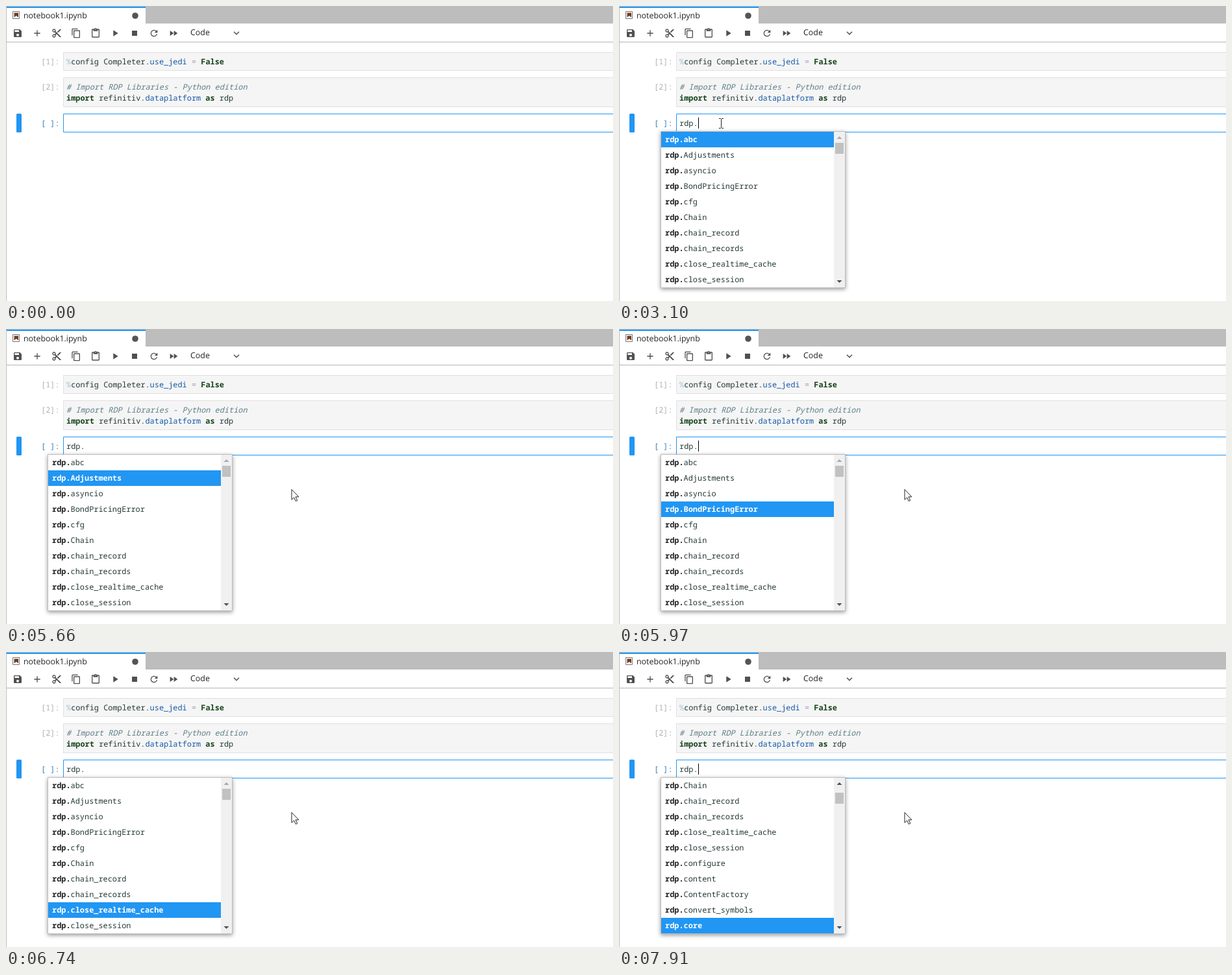
An HTML page for the animation above (8000 ms loop, 935 px wide and 455 px high).

```html
<!DOCTYPE html>
<html lang="en">
<head>
<meta charset="utf-8">
<title>Notebook completion</title>
<style>
html, body { margin: 0; width: 100%; height: 100%; overflow: hidden; background: #fff; }
svg { display: block; }
text { font: 11.91px "Noto Sans Mono", monospace; fill: #263a3a; text-rendering: geometricPrecision; white-space: pre; }
.ui { font: 12.4px "Open Sans", "Noto Sans", sans-serif; fill: #212121; }
.kw { font-weight: bold; fill: #17431b; }
.prop { fill: #1759a8; }
.note { font-style: italic; fill: #5f7f8a; }
.num { fill: #b0b0b0; }
.cell { fill: #f5f5f5; stroke: #e0e0e0; }
.icon { fill: #505050; }
#popup .frame { fill: #fff; stroke: #bdbdbd; filter: drop-shadow(0 2px 3px rgba(0, 0, 0, .4)); }
.head { font-weight: bold; fill: #212121; }
.hover { opacity: .8; }
.hover rect { fill: #eee; }
.active rect { fill: #2196f3; }
.active text, .active .head { fill: #fff; font-weight: bold; }
</style>
</head>
<body>
<svg width="935" height="455" viewBox="0 0 935 455">
  <path fill="#bdbdbd" d="M0 0H935V27H0zM0 27H1V455H0zM0 55H935V56H0z"/>
  <path fill="#f2f2f2" d="M1 56H935V57H1z"/>
  <path fill="#fff" d="M1 1H215V28H1z"/>
  <path fill="#2196f3" d="M1 1H215V3H1z"/>
  <path fill="#fff" stroke="#757575" d="M10.5 8.5h10v11h-10z"/>
  <path fill="#74391a" d="M12.5 10.5h6.5v7l-3.2-2.6-3.3 2.6z"/>
  <text class="ui" x="27" y="19">notebook1.ipynb</text>
  <circle cx="199" cy="15" r="4.8" fill="#555"/>
  <g id="tools" class="icon"></g>
  <text class="ui" x="284" y="45">Code</text>
  <path fill="none" stroke="#505050" stroke-width="1.5" d="M351 39.8l4 4 4-4"/>

  <path class="cell" d="M88.5 71.5H940V99.5H88.5zM88.5 110.5H940V155.5H88.5z"/>
  <path fill="#fff" stroke="#2196f3" d="M88.5 166.5H940V194.5H88.5z"/>
  <rect x="16" y="166" width="8" height="29" rx="1.5" fill="#2196f3"/>
  <text class="num" x="54" y="90">[1]:</text>
  <text class="num" x="54" y="129">[2]:</text>
  <text x="54" y="185" style="fill:#307fc1">[ ]:</text>
  <text x="93" y="90"><tspan fill="#a5c6d8">%</tspan>config Completer.<tspan class="prop">use_jedi</tspan> <tspan fill="#a29aae">=</tspan> <tspan class="kw">False</tspan></text>
  <text class="note" x="93" y="129"># Import RDP Libraries - Python edition</text>
  <text x="93" y="146"><tspan class="kw">import</tspan> refinitiv.<tspan class="prop">dataplatform</tspan> <tspan class="kw">as</tspan> rdp</text>
  <text id="typed" x="93" y="185"></text>
  <rect id="caret" y="172" width="1" height="17"/>

  <g id="popup">
    <rect class="frame" x="64.5" y="193.5" width="284" height="241"/>
    <g id="rows"></g>
    <path fill="#f0f0f0" d="M331 194h17v240h-17z"/>
    <rect id="thumb" x="333" width="13" height="17" fill="#c1c1c1"/>
    <path id="up" d="M335.5 205l4-4 4 4z"/>
    <path fill="#505050" d="M335.5 423l4 4 4-4z"/>
  </g>

  <path id="beam" fill="none" stroke="#222" d="M-3 -7.5h2.5l1 1 1-1h2.5M.5 -6.5v13M-3 7.5h2.5l1-1 1 1h2.5"/>
  <path id="arrow" fill="#fff" stroke="#222" d="M0 .5v15.8l3.6-3.4 2.7 5.6 2.4-1.1-2.7-5.5h5z"/>
</svg>
<script>
const $ = id => document.getElementById(id);
const LOOP = 8000, CHAR = 7.146, ROWS = 10;

// 24-unit toolbar icons, 30 px apart
const icons = [
  'M17 3H5c-1.1 0-2 .9-2 2v14c0 1.1.9 2 2 2h14c1.1 0 2-.9 2-2V7zm-5 16a3 3 0 1 1 0-6 3 3 0 0 1 0 6zm3-10H5V5h10z',
  'M19 13h-6v6h-2v-6H5v-2h6V5h2v6h6z',
  'M9.64 7.64A4 4 0 1 0 7.64 9.64L10 12l-2.36 2.36A4 4 0 1 0 9.64 16.36L12 14l7 7h3v-1zM6 8a2 2 0 1 1 0-4 2 2 0 0 1 0 4zm0 12a2 2 0 1 1 0-4 2 2 0 0 1 0 4zM19 3l-6 6 2 2 7-7V3z',
  'M16 1H4c-1.1 0-2 .9-2 2v14h2V3h12zm3 4H8c-1.1 0-2 .9-2 2v14c0 1.1.9 2 2 2h11c1.1 0 2-.9 2-2V7c0-1.1-.9-2-2-2zm0 16H8V7h11z',
  'M19 2h-4.18a3 3 0 0 0-5.64 0H5c-1.1 0-2 .9-2 2v16c0 1.1.9 2 2 2h14c1.1 0 2-.9 2-2V4c0-1.1-.9-2-2-2zm-7 0a1 1 0 1 1 0 2 1 1 0 0 1 0-2zm7 18H5V4h2v3h10V4h2z',
  'M8 5v14l11-7z',
  'M6 6h12v12H6z',
  'M17.65 6.35A8 8 0 1 0 19.73 14h-2.08A6 6 0 1 1 16.22 7.78L13 11h7V4z',
  'M4 18l8.5-6L4 6zM13 6v12l8.5-6z'
];
$('tools').innerHTML = icons.map((d, i) =>
  `<path fill-rule="evenodd" transform="translate(${10 + 30 * i} 34) scale(.6667)" d="${d}"/>`).join('');

const names = ('abc Adjustments asyncio BondPricingError cfg Chain chain_record chain_records ' +
  'close_realtime_cache close_session configure content ContentFactory convert_symbols core').split(' ');
$('rows').innerHTML = Array.from({ length: ROWS }, (_, i) =>
  `<g transform="translate(65 ${194 + 24 * i})"><rect width="266" height="24" fill="#fff"/>` +
  '<text x="6" y="16"><tspan class="head">rdp.</tspan><tspan></tspan></text></g>').join('');
const rows = [...$('rows').children];

const keys = [1940, 2130, 2320, 2640];
const blinks = [470, 1000, 1240, 1770, 1940, 3190, 3730, 4270, 4730, 5260, 5800, 6340, 6900, 7370, 7910];
const downs = [5660, 5800, 5960, 6110, 6260, 6420, 6580, 6740, 6900, 7050, 7210, 7370, 7530, 7680];
const moves = [
  { from: [305, 393], to: [157, 181], start: 470, end: 1240 },
  { from: [157, 181], to: [440, 247], start: 3730, end: 4270 }
];

const passed = (times, t) => times.filter(s => t >= s).length;
const show = (el, on) => el.style.display = on ? '' : 'none';

// The pointer moves in 70 ms steps, easing in and out
function pointer(t) {
  const m = moves[t < 3730 ? 0 : 1];
  const step = Math.floor((t - m.start) / 70) * 70;
  const p = t >= m.end ? 1 : Math.max(0, step / (m.end - m.start));
  const e = p * p * (3 - 2 * p);
  return m.from.map((a, i) => Math.round(a + (m.to[i] - a) * e));
}

function draw(t) {
  const count = passed(keys, t);
  $('typed').textContent = 'rdp.'.slice(0, count);
  $('caret').setAttribute('x', Math.round(93 + CHAR * count));
  show($('caret'), passed(blinks, t) % 2);

  const [x, y] = pointer(t), open = t >= 3100;
  const inCell = x > 88 && y > 166 && y < 194;
  show($('beam'), t >= 470 && inCell);
  show($('arrow'), t >= 470 && !inCell);
  for (const id of ['beam', 'arrow']) $(id).setAttribute('transform', `translate(${x} ${y})`);

  show($('popup'), open);
  const selected = passed(downs, t), scroll = Math.max(0, selected - ROWS + 1);
  const hover = x > 65 && x < 331 ? Math.floor((y - 194) / 24) : -1;
  rows.forEach((row, i) => {
    row.querySelector('text').lastChild.textContent = names[i + scroll];
    row.setAttribute('class', i + scroll === selected ? 'active' : i === hover ? 'hover' : '');
  });
  $('thumb').setAttribute('y', 211 + Math.round(scroll * 1.2));
  $('up').setAttribute('fill', scroll ? '#505050' : '#a3a9b8');
}

function tick() {
  draw(performance.now() % LOOP);
  requestAnimationFrame(tick);
}
tick();
</script>
</body>
</html>
```
